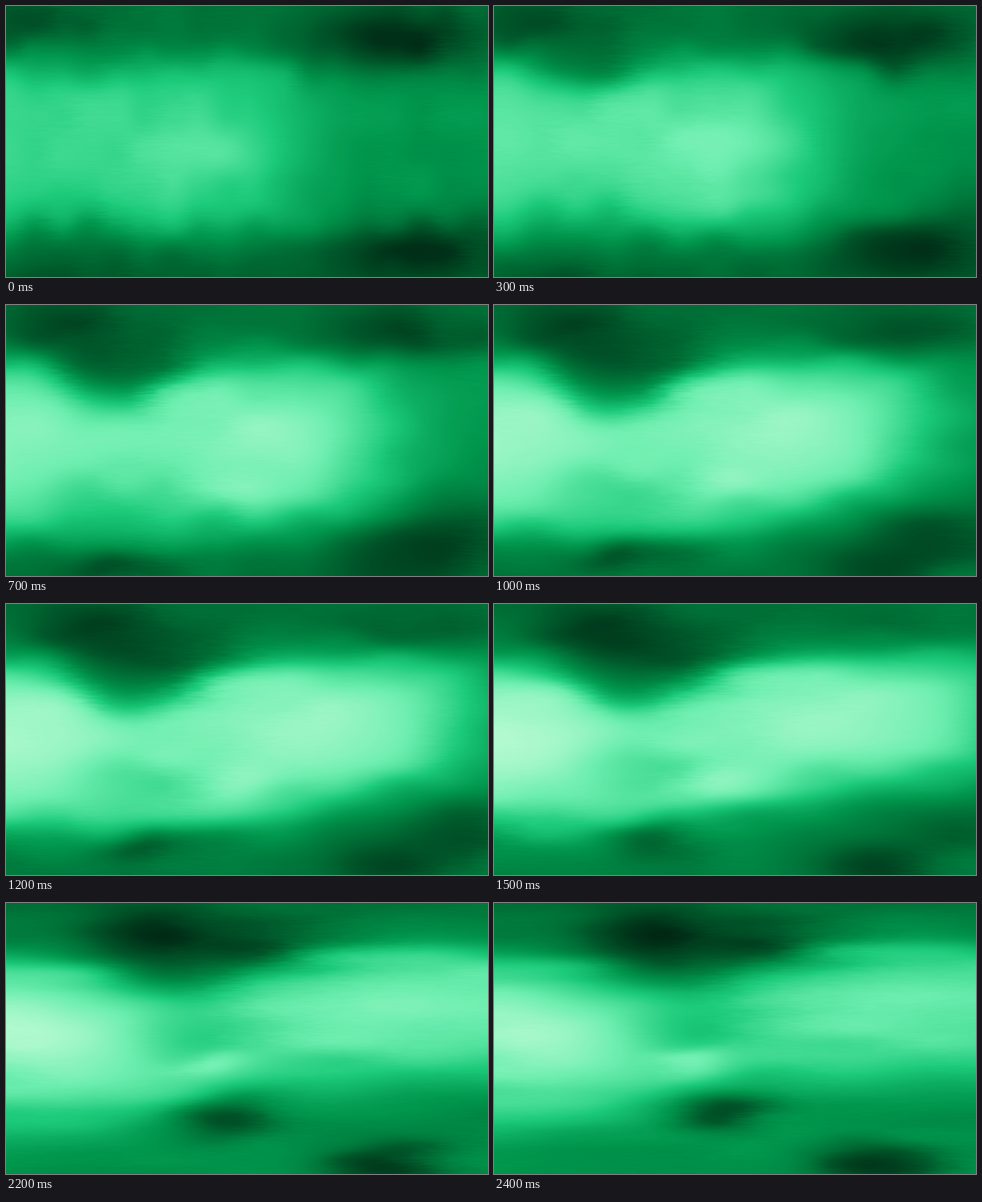
An HTML page with a canvas for the animation above (2.5 s loop, 559 by 315 pixels).

```html
<!DOCTYPE html>
<html lang="en">
<head>
<meta charset="utf-8">
<title>Green clouds</title>
<style>
html, body { margin: 0; width: 100%; height: 100%; overflow: hidden; background: #00381c; }
canvas { display: block; }
</style>
</head>
<body>
<canvas id="stage" width="559" height="315"></canvas>
<script>
const W = 559, H = 315, LOOP = 2500, STEP = 100, CELL = 4;
const COLS = Math.ceil(W / CELL) + 2, ROWS = Math.ceil(H / CELL) + 2;
const ctx = document.getElementById('stage').getContext('2d');
const image = ctx.createImageData(W, H);
const field = new Float32Array(COLS * ROWS);

const mix = (a, b, k) => a + (b - a) * k;
const sigmoid = u => 1 / (1 + Math.exp(-u));
const bell = u => Math.exp(-u * u);
const hash = (x, y) => {
  const s = Math.sin(x * 127.1 + y * 311.7) * 43758.5453;
  return s - Math.floor(s);
};

function noise(x, y) {
  const i = Math.floor(x), j = Math.floor(y);
  const ease = u => u * u * (3 - 2 * u);
  const u = ease(x - i), v = ease(y - j);
  return mix(mix(hash(i, j), hash(i + 1, j), u), mix(hash(i, j + 1), hash(i + 1, j + 1), u), v) - .5;
}

const ramp = [[0, 40, 20], [0, 88, 42], [0, 150, 76], [28, 202, 122], [110, 238, 176], [195, 252, 215]];
const shades = Array.from({ length: 256 }, (_, i) => {
  const s = i / 255 * 5, k = Math.min(4, Math.floor(s));
  return ramp[k].map((c, j) => mix(c, ramp[k + 1][j], s - k));
});

// A soft oval that drifts and gains light (or shade) at a steady rate per second
const cloud = (x, y, vx, vy, size, light, gain) => t => {
  const cx = x + vx * t, cy = y + vy * t, power = light + gain * t;
  return (px, py) => {
    const dx = (px - cx) / size, dy = (py - cy) / (size * .4);
    return power * Math.exp(-dx * dx - dy * dy);
  };
};
const clouds = [
  cloud(450, 40, 10, 0, 90, -.28, .14),
  cloud(25, 22, 65, 5, 70, -.12, -.06),
  cloud(60, 72, 102, -11, 62, -.02, -.07),
  cloud(470, 288, 45, -18, 78, -.22, .08),
  cloud(440, 305, 0, 0, 65, 0, -.14),
  cloud(60, 325, 83, -36, 55, -.08, -.08),
  cloud(70, 255, 70, -45, 85, -.1, -.03),
  cloud(35, 155, 0, 0, 120, -.02, .08),
  cloud(250, 168, 85, -22, 85, .08, -.02),
  cloud(300, 230, -27, -20, 45, .02, .05)
];

// A bright band that spreads to the right between two curved edges
function band(x, t) {
  const peak = .68 + .25 * t - .09 * t * t;
  return {
    light: mix(.4, peak, sigmoid((320 + 170 * t - x) / 35)),
    top: 64 - 14 * sigmoid((x - 400) / 50) * bell(t - 1.7)
      + (68 - 13 * t) * bell((x - 100 - 48 * t) / (50 + 32 * t)) * Math.min(1, t + .1),
    bottom: 264 - 4 * t - 58 * sigmoid((x - 550 + 150 * t) / 60)
  };
}

function fillField(t) {
  const now = clouds.map(c => c(t));
  const wide = 32 + 30 * t, tall = 42 - 10 * t;
  const columns = Array.from({ length: COLS }, (_, c) => band(c * CELL, t));
  for (let r = 0; r < ROWS; r++) {
    for (let c = 0; c < COLS; c++) {
      const { light, top, bottom } = columns[c];
      const nx = (c * CELL - 40 * t) / wide, ny = r * CELL / tall;
      const n = noise(nx + 9, ny);
      const x = c * CELL + 24 * n, y = r * CELL + 16 * noise(nx, ny + 20);
      const above = mix(.28, light, sigmoid((y - top) / 13));
      const below = mix(.22 + .07 * t, light, sigmoid((bottom - y) / 16));
      field[r * COLS + c] = now.reduce((sum, c) => sum + c(x, y), Math.min(above, below)) + n * .05;
    }
  }
}

function sample(x, y) {
  const gx = Math.max(0, Math.min(COLS - 1.01, x / CELL)), gy = y / CELL;
  const c = Math.floor(gx), r = Math.floor(gy), k = r * COLS + c;
  return mix(mix(field[k], field[k + 1], gx - c), mix(field[k + COLS], field[k + COLS + 1], gx - c), gy - r);
}

// Fine horizontal brush grain
const grain = Float32Array.from({ length: W * H }, (_, i) => noise(i % W / 14, Math.floor(i / W) * .7 + 50));

function draw(t) {
  fillField(t);
  for (let y = 0, i = 0; y < H; y++) {
    for (let x = 0; x < W; x++, i++) {
      const v = sample(x + grain[i] * 8, y) + grain[i] * .012;
      image.data.set(shades[Math.max(0, Math.min(255, Math.round(v * 255)))], i * 4);
      image.data[i * 4 + 3] = 255;
    }
  }
  ctx.putImageData(image, 0, 0);
}

const start = performance.now();
let shown = -1;
function tick() {
  const step = Math.floor((performance.now() - start) % LOOP / STEP);
  if (step !== shown) draw((shown = step) * STEP / 1000);
  requestAnimationFrame(tick);
}
tick();
</script>
</body>
</html>
```
